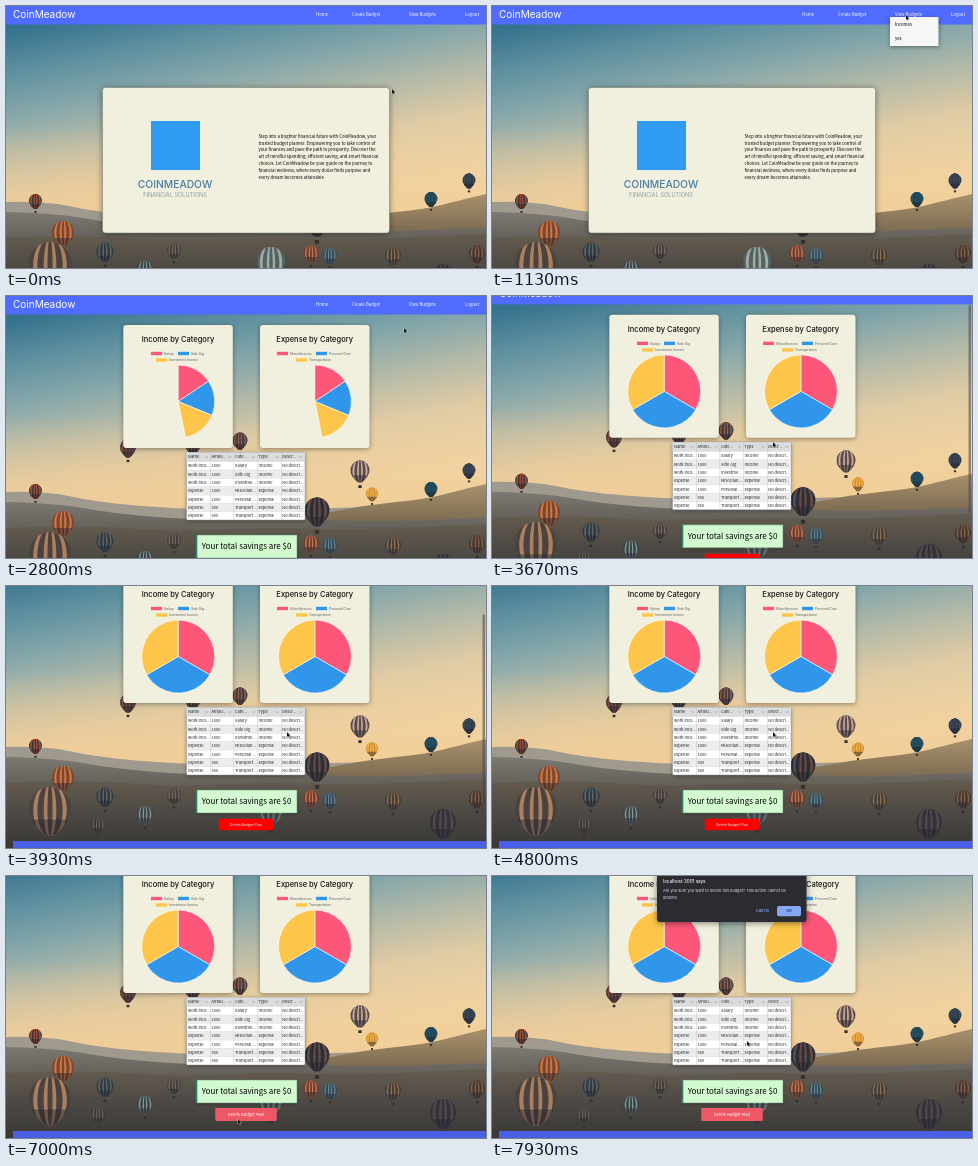
Animation, 480 px wide and 262 px high, one loop 8000 ms. Source, as an HTML page with a canvas:

```html
<!DOCTYPE html>
<html lang="en">
<head>
<meta charset="utf-8">
<title>Budget planner</title>
<style>
html, body { margin: 0; width: 100%; height: 100%; overflow: hidden; background: #8fa9ac; }
canvas { display: block; width: 480px; height: 262px; }
</style>
</head>
<body>
<canvas id="stage"></canvas>
<script>
const W = 480, H = 262, LOOP = 8000;
const canvas = document.getElementById('stage');
const dpr = window.devicePixelRatio || 1;
canvas.width = W * dpr;
canvas.height = H * dpr;
const ctx = canvas.getContext('2d');

const BODY = '"Noto Sans CJK JP", "Noto Sans CJK SC", "Noto Sans CJK", "Open Sans", sans-serif';
const HEAD = 'Inter, Lato, sans-serif';
const ARIAL = '"Liberation Sans", Arial, sans-serif';
const PINK = '#fc5779', BLUE = '#3096ea', GOLD = '#fdc64b', CREAM = '#f1f0de', NAV = '#4f6cff';
const BRAND = 'CoinMeadow';

// Times at which the interface changes
const MENU_IN = 1000, HOVER = 1800, OPEN = 2655, DIALOG = 7260;

const clamp = v => Math.max(0, Math.min(1, v));
const ramp = (t, from, span) => clamp((t - from) / span);
const smooth = v => v * v * (3 - 2 * v);

// Value at time t from [time, ...values] keys
function track(keys, t, ease = v => v) {
  let i = 0;
  while (i < keys.length - 2 && t >= keys[i + 1][0]) i++;
  const a = keys[i], b = keys[i + 1];
  const k = ease(ramp(t, a[0], b[0] - a[0]));
  return a.slice(1).map((v, n) => v + (b[n + 1] - v) * k);
}

const SCROLL = [[3500, 0], [3600, 3.5], [3670, 10], [3850, 33], [3930, 35]];
const POINTER = [
  [0, 386, 83], [950, 414, 9], [1600, 414, 9], [2000, 412, 18], [2620, 412, 19],
  [2800, 398, 32], [3350, 281, 146], [5640, 281, 146],
  [6000, 229, 250], [6450, 229, 249], [6650, 232, 243], [7770, 232, 243],
  [7930, 255, 165], [8000, 264, 134]
];

function rect(x, y, w, h, fill) {
  ctx.fillStyle = fill;
  ctx.fillRect(x, y, w, h);
}

function box(x, y, w, h, r, fill, stroke) {
  ctx.beginPath();
  ctx.roundRect(x, y, w, h, r);
  ctx.fillStyle = fill;
  ctx.fill();
  if (stroke) {
    ctx.shadowColor = 'transparent';
    ctx.strokeStyle = stroke;
    ctx.lineWidth = 0.5;
    ctx.stroke();
  }
}

function shadowed(blur, color, draw) {
  ctx.save();
  ctx.shadowColor = color;
  ctx.shadowBlur = blur * dpr;
  ctx.shadowOffsetY = dpr;
  draw();
  ctx.restore();
}

// yc is the middle of the capitals
function text(str, x, yc, size, { font = BODY, color = '#111', weight = 400, align = 'left' } = {}) {
  ctx.font = `${weight} ${size}px ${font}`;
  ctx.fillStyle = color;
  ctx.textAlign = align;
  ctx.fillText(str, x, yc + size * 0.35);
}

function ridge(points, fill) {
  ctx.beginPath();
  ctx.moveTo(...points[0]);
  for (let i = 1; i < points.length - 1; i++) {
    const [x, y] = points[i], [nx, ny] = points[i + 1];
    ctx.quadraticCurveTo(x, y, (x + nx) / 2, (y + ny) / 2);
  }
  ctx.lineTo(...points[points.length - 1]);
  ctx.lineTo(W, 310);
  ctx.lineTo(points[0][0], 310);
  ctx.fillStyle = fill;
  ctx.fill();
}

function gradient(x0, y0, x1, y1, stops) {
  const g = ctx.createLinearGradient(x0, y0, x1, y1);
  stops.forEach(([at, c]) => g.addColorStop(at, c));
  return g;
}

function balloon(x, y, r, dark, light) {
  ctx.save();
  ctx.beginPath();
  ctx.arc(x, y, r, Math.PI * 0.92, Math.PI * 0.08);
  ctx.quadraticCurveTo(x + r * 0.85, y + r * 0.75, x + r * 0.22, y + r * 1.3);
  ctx.lineTo(x - r * 0.22, y + r * 1.3);
  ctx.quadraticCurveTo(x - r * 0.85, y + r * 0.75, x - r, y + r * 0.25);
  ctx.fillStyle = dark;
  ctx.fill();
  ctx.clip();
  [[0.8, light], [0.6, dark], [0.3, light], [0.12, dark]].forEach(([k, c]) => {
    ctx.beginPath();
    ctx.ellipse(x, y + r * 0.1, r * k, r * 1.3, 0, 0, 7);
    ctx.fillStyle = c;
    ctx.fill();
  });
  rect(x - r, y + r * 0.55, r * 2, r, 'rgba(35,35,45,.45)');
  ctx.restore();
  rect(x - r * 0.17, y + r * 1.6, r * 0.34, r * 0.3, '#35302e');
}

const BALLOONS = [
  [29.5, 194.5, 6.5, '#3a3742', '#b4562f'], [57, 226, 11, '#7c4634', '#cf7a3e'],
  [44, 257, 21, '#4b423f', '#a8805f'], [99, 245, 8.5, '#2f3a42', '#5f6463'],
  [139, 263, 8, '#2f444c', '#8f9189'], [168, 244, 7, '#34434c', '#8a6148'],
  [92, 273, 7, '#3a3b3d', '#6d6150'], [265, 255, 14, '#4d6468', '#a9aa9c'],
  [305, 247, 7.5, '#6e3a34', '#c4794a'], [324, 249, 7, '#2f4a5c', '#6b8288'],
  [122, 151, 8, '#4a3d42', '#8d5440'], [187, 149, 7.5, '#3d3f48', '#9b6a4a'],
  [234, 144, 7.5, '#3a3c46', '#a1603f'], [311, 214, 12.5, '#26303e', '#6f4a3c'],
  [354, 174, 9.5, '#5c4a4c', '#c9ad98'], [366, 197.5, 6, '#d38a2c', '#f2bd55'],
  [425, 192.5, 6.5, '#1f4656', '#295363'], [463, 174, 6.5, '#273f50', '#4a4650'],
  [387, 249, 8, '#3f3d3c', '#8f6d4b'], [437, 271, 13, '#2d3440', '#5b4442'],
  [471, 247, 8, '#3f3936', '#8a5c40']
];

function scenery() {
  // Sky bands lean upwards to the right
  rect(0, 0, W, 310, gradient(0, 0, 48, 252, [
    [0, '#2a6a88'], [0.1, '#36738e'], [0.25, '#5c8f9f'], [0.42, '#86a7aa'],
    [0.58, '#b5baa8'], [0.75, '#dfcba4'], [1, '#f2d6a6']
  ]));
  rect(0, 0, W, 310, gradient(0, 120, 0, 215, [[0, 'rgba(240,205,152,0)'], [1, 'rgba(241,204,150,.85)']]));
  ridge([[0, 196], [40, 195], [90, 206], [170, 213], [260, 214], [360, 211], [480, 207]], '#a09a8e');
  ridge([[220, 228], [300, 221], [360, 209], [420, 203], [455, 194], [480, 188]],
    gradient(0, 188, 0, 250, [[0, '#a8906a'], [0.5, '#857257'], [1, '#55504a']]));
  ridge([[0, 206], [50, 207], [110, 218], [190, 224], [280, 222], [360, 226], [480, 222]],
    gradient(0, 205, 0, 245, [[0, '#7d7a73'], [1, '#5a564f']]));
  ridge([[0, 232], [80, 229], [170, 236], [260, 231], [350, 234], [480, 228]],
    gradient(0, 228, 0, 297, [[0, '#655c50'], [0.5, '#4c4843'], [1, '#393836']]));
  BALLOONS.forEach(b => balloon(...b));
}

function navbar() {
  rect(0, 0, W, 18.5, NAV);
  text(BRAND, 7, 8, 10, { font: HEAD, color: '#fff' });
  [['Home', 310], ['Create Budget', 346], ['View Budgets', 403], ['Logout', 459]]
    .forEach(([label, x]) => text(label, x, 8, 4.3, { color: '#fff', weight: 500 }));
}

const INTRO = [
  `Step into a brighter financial future with ${BRAND}, your`,
  'trusted budget planner. Empowering you to take control of',
  'your finances and pave the path to prosperity. Discover the',
  'art of mindful spending, efficient saving, and smart financial',
  `choices. Let ${BRAND} be your guide on the journey to`,
  'financial wellness, where every dollar finds purpose and',
  'every dream becomes attainable.'
];

function landing() {
  shadowed(6, 'rgba(0,0,0,.45)', () => box(96.5, 81.5, 287, 145.5, 3, CREAM, '#77776a'));
  rect(145, 115, 49, 49, '#2f9bf3');
  text(BRAND.toUpperCase(), 169, 178, 10.3, { font: HEAD, weight: 500, color: '#4b7ba4', align: 'center' });
  text('FINANCIAL SOLUTIONS', 169, 189.5, 5.6, { font: HEAD, color: '#8b9ca4', align: 'center' });
  INTRO.forEach((line, i) => text(line, 252.5, 130.3 + i * 6.8, 4.3, { weight: 500, color: '#000' }));
}

function menu(hover) {
  shadowed(4, 'rgba(0,0,0,.4)', () => rect(398, 11, 48.5, 29, '#f6f6f6'));
  if (hover) rect(398, 11, 48.5, 14.5, '#d9d9d9');
  text('Incomes', 403, 18, 4.3, { color: '#000' });
  text('yes', 403, 32, 4.3, { color: '#000' });
}

function pie(cx, cy, sweep) {
  const step = sweep * Math.PI * 2 / 3;
  [PINK, BLUE, GOLD].forEach((c, i) => {
    const from = -Math.PI / 2 + i * step;
    ctx.beginPath();
    ctx.moveTo(cx, cy);
    ctx.arc(cx, cy, 36.5, from, from + step);
    ctx.closePath();
    ctx.fillStyle = c;
    ctx.fill();
    ctx.strokeStyle = '#fff';
    ctx.lineWidth = 0.6;
    ctx.stroke();
  });
}

function chart(x, title, legend, sweep) {
  shadowed(5, 'rgba(0,0,0,.4)', () => box(x, 29, 109.5, 123, 3, CREAM));
  text(title, x + 54.7, 43.6, 7.5, { font: HEAD, weight: 500, align: 'center' });
  legend.forEach(([label, lx, y, c]) => {
    rect(lx, y - 1.7, 11, 3.4, c);
    text(label, lx + 13, y, 3.45, { font: ARIAL, color: '#666' });
  });
  if (sweep > 0) pie(x + 54.9, 105.5, sweep);
}

const COLS = [181, 204.5, 228, 251.5, 275.3];
const HEADS = ['Name', 'Amou...', 'Cate...', 'Type', 'Descr...'];
const ROWS = [
  [1000, 'Salary'], [1000, 'Side Gig'], [1000, 'Investme...'], [1000, 'Miscellan...'],
  [1000, 'Personal ...'], [500, 'Transport...'], [500, 'Transport...']
];

function table() {
  shadowed(4, 'rgba(0,0,0,.4)', () => box(180.5, 156.5, 118.5, 67.5, 1, '#fff', '#8e8e8e'));
  rect(180.5, 156.5, 118.5, 9, '#dadcdd');
  ROWS.forEach((row, i) => {
    const y = 165.5 + i * 8.36, income = i < 3;
    if (i % 2) rect(181, y, 117.5, 8.36, '#ebeced');
    rect(181, y, 117.5, 0.3, '#c9c9c9');
    const cells = [income ? 'work inco...' : 'expense', row[0], row[1], income ? 'Income' : 'Expense', 'No descri...'];
    cells.forEach((v, n) => text(String(v), COLS[n] + 1, y + 4.4, 4.05, { color: '#222' }));
  });
  COLS.forEach((x, i) => {
    if (i) rect(x - 0.3, 156.5, 0.4, 67.5, '#bfbfbf');
    text(HEADS[i], x + 1, 161, 4.05, { color: '#222' });
    ctx.beginPath();
    ctx.moveTo(x + 18.3, 160.4);
    ctx.lineTo(x + 19.5, 161.6);
    ctx.lineTo(x + 20.7, 160.4);
    ctx.strokeStyle = '#666';
    ctx.lineWidth = 0.5;
    ctx.stroke();
  });
}

function deleteButton(hover) {
  const mix = (a, b) => Math.round(a + (b - a) * hover);
  const s = 1 + 0.13 * hover;
  ctx.save();
  ctx.translate(240, 273.5);
  ctx.scale(s, s);
  box(-27.2, -5.7, 54.4, 11.4, 1, `rgb(${mix(255, 238)},${mix(0, 88)},${mix(0, 102)})`);
  text('Delete Budget Plan', 0, 0, 3.6, { color: '#fff', align: 'center' });
  ctx.restore();
}

function budget(t) {
  const sweep = 1 - Math.pow(1 - ramp(t, OPEN, 1000), 4);
  chart(117.3, 'Income by Category', [
    ['Salary', 145, 57.5, PINK], ['Side Gig', 172, 57.5, BLUE], ['Investment Income', 150, 64, GOLD]
  ], sweep);
  chart(254, 'Expense by Category', [
    ['Miscellaneous', 271, 57.5, PINK], ['Personal Care', 310, 57.5, BLUE], ['Transportation', 290, 64, GOLD]
  ], sweep);
  table();
  shadowed(3, 'rgba(0,0,0,.35)', () => box(190, 239, 101, 23, 0.5, '#d2f9d0', '#5f8f68'));
  rect(189.5, 239, 1.8, 23, '#2e7d6b');
  text('Your total savings are $0', 240.5, 250, 8, { weight: 500, color: '#000', align: 'center' });
  deleteButton(smooth(ramp(t, 6550, 300)));
  rect(7, 290, W, 10, '#4b5fe6');
}

function dialog(alpha) {
  ctx.save();
  ctx.globalAlpha = alpha;
  shadowed(6, 'rgba(0,0,0,.5)', () => box(165, -6, 149.5, 52, 3, '#2b2c31'));
  const ui = (str, x, y, size, color, weight = 400, align = 'left') =>
    text(str, x, y, size, { font: HEAD, color, weight, align });
  ui('localhost:3001 says', 171, 5, 4.5, '#f0f0f2', 500);
  ui('Are you sure you want to delete this budget? This action cannot be', 171, 15, 3.9, '#dcdce0');
  ui('undone.', 171, 21.5, 3.9, '#dcdce0');
  ui('Cancel', 270.5, 35, 3.9, '#8fb0f4', 500, 'center');
  box(285, 30, 24, 10.2, 2, '#86a7f3');
  ui('OK', 297, 35, 3.9, '#1c2a4c', 500, 'center');
  ctx.restore();
}

function pointer(x, y) {
  ctx.beginPath();
  [[0, 0], [0, 4.8], [1.1, 3.9], [1.9, 5.6], [2.6, 5.2], [2, 3.6], [3.4, 3.5]]
    .forEach(([dx, dy]) => ctx.lineTo(x + dx, y + dy));
  ctx.closePath();
  ctx.lineWidth = 0.7;
  ctx.lineJoin = 'round';
  ctx.strokeStyle = 'rgba(255,255,255,.7)';
  ctx.stroke();
  ctx.fillStyle = '#111';
  ctx.fill();
}

function render(t) {
  const [scroll] = track(SCROLL, t);
  ctx.setTransform(dpr, 0, 0, dpr, 0, 0);
  ctx.save();
  ctx.translate(0, -scroll);
  scenery();
  navbar();
  if (t < OPEN) landing();
  else budget(t);
  ctx.restore();

  if (t >= MENU_IN && t < OPEN) menu(t >= HOVER);
  const bar = ramp(t, 3500, 60) * (1 - ramp(t, 4500, 250));
  if (bar > 0) box(476.5, 1 + scroll * 0.78, 2.5, 208, 1.2, `rgba(70,70,70,${0.55 * bar})`);
  if (t >= DIALOG) dialog(ramp(t, DIALOG - 40, 180));
  pointer(...track(POINTER, t, smooth));
}

const start = performance.now();
function tick() {
  render((performance.now() - start) % LOOP);
  requestAnimationFrame(tick);
}
tick();
</script>
</body>
</html>
```
